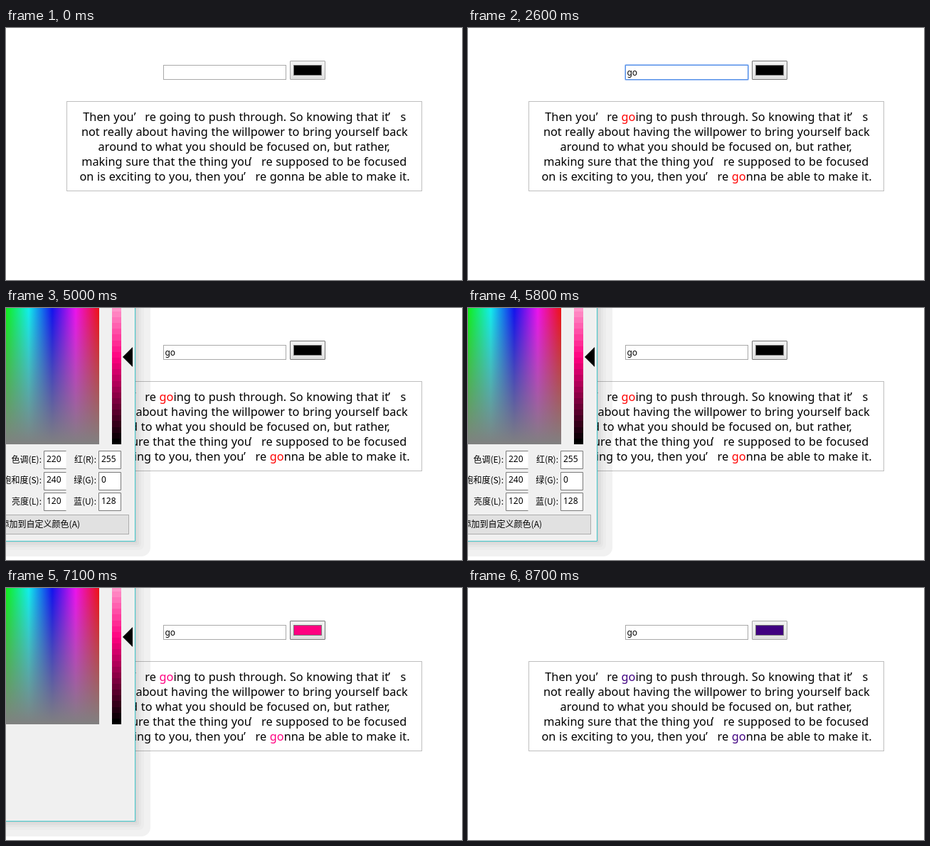
Write an HTML page that moves like this. It is 641x355 px and loops after 9700 ms.

```html
<!DOCTYPE html>
<html lang="en">
<head>
<meta charset="utf-8">
<title>Keyword highlighter</title>
<style>
  html, body { margin: 0; width: 100%; height: 100%; overflow: hidden; background: #fff; }
  svg { display: block; }
  text { white-space: pre; }
  .copy { font: 16.3px "Noto Sans", "Open Sans", sans-serif; word-spacing: .45px; }
  .entry { font: 12px "Noto Sans", "Open Sans", sans-serif; }
  .label { font: 12px "Noto Sans CJK SC", "Noto Sans CJK", "Noto Sans CJK JP", sans-serif; }
</style>
</head>
<body>
<svg id="stage" width="641" height="355" viewBox="0 0 641 355">
  <defs>
    <linearGradient id="hues" gradientUnits="userSpaceOnUse" x1="-1" x2="131" y1="0" y2="0">
      <stop offset="0" stop-color="#0f0"/>
      <stop offset=".25" stop-color="#0ff"/>
      <stop offset=".5" stop-color="#00f"/>
      <stop offset=".75" stop-color="#f0f"/>
      <stop offset="1" stop-color="#f00"/>
    </linearGradient>
    <linearGradient id="fade" x1="0" x2="0" y1="0" y2="1">
      <stop offset="0" stop-color="#808080" stop-opacity=".14"/>
      <stop offset="1" stop-color="#808080"/>
    </linearGradient>
    <linearGradient id="face" x1="0" x2="0" y1="0" y2="1">
      <stop offset=".3" stop-color="#f0f0f0"/>
      <stop offset="1" stop-color="#dedede"/>
    </linearGradient>
    <clipPath id="ghostArea"><rect x="140" y="200" width="41" height="28"/></clipPath>
  </defs>
  <rect width="641" height="355" fill="#fff"/>
  <rect x="85.5" y="103.5" width="499" height="126" fill="#fff" stroke="#bfbfbf"/>
  <g id="copy" class="copy"></g>

  <rect id="ring" x="220.5" y="51.5" width="174" height="22" rx="1" fill="none" stroke="#a6c5f5"/>
  <rect id="input" x="221.5" y="52.5" width="172" height="20" fill="#fff"/>
  <text id="query" class="entry" x="223.4" y="67"></text>
  <rect id="caret" y="55" width="1" height="15"/>

  <rect id="button" x="399.5" y="46.5" width="49" height="26" rx=".5" fill="url(#face)"/>
  <rect id="swatch" x="404.5" y="52.5" width="39" height="14" stroke="#777"/>

  <g id="dialog">
    <g id="shadow"></g>
    <rect width="182" height="329" fill="#f0f0f0"/>
    <path d="M181.5 0V328.5H0" fill="none" stroke="#3fc6c9"/>
    <rect width="131" height="192" fill="url(#hues)"/>
    <rect width="131" height="192" fill="url(#fade)"/>
    <path id="marker" d="M62 182h3v6h-3zM54 188h6v4h-6zM67 188h6v4h-6z"/>
    <g id="bar"></g>
    <path id="arrow" d="M164 0L178 -14V14Z"/>
    <g id="controls">
      <g id="fields"></g>
      <rect id="add" x="-20.5" y="291.5" width="193" height="27"/>
      <text class="label" x="104" y="309" text-anchor="end">添加到自定义颜色(A)</text>
    </g>
    <text id="ghost" class="copy" x="144.5" y="215" opacity=".07" clip-path="url(#ghostArea)">exciting</text>
  </g>
</svg>
<script>
const LOOP = 9700;
const $ = id => document.getElementById(id);

function add(parent, tag, attrs, text) {
  const el = document.createElementNS("http://www.w3.org/2000/svg", tag);
  set(el, attrs);
  if (text) el.textContent = text;
  parent.appendChild(el);
  return el;
}
function set(el, attrs) {
  for (const key in attrs) el.setAttribute(key, attrs[key]);
}
const show = (id, on) => set($(id), { visibility: on ? "visible" : "hidden" });
const within = (t, from, to) => t >= from && t < to;

// Last value whose start time has been reached
const at = (t, steps) => steps.reduce((value, [start, next]) => t >= start ? next : value, null);

// Each run: x, line, text
const RUNS = [
  [108.3, 0, "Then you"], [179.7, 0, "’"],
  [195.3, 0, "re going to push through. So knowing that it"], [537.3, 0, "’"], [554.5, 0, "s"],
  [105.9, 1, "not really about having the willpower to bring yourself back"],
  [129.6, 2, "around to what you should be focused on, but rather,"],
  [106.2, 3, "making sure that the thing you"], [342.5, 3, "’"],
  [359, 3, "re supposed to be focused"],
  [103.4, 4, "on is exciting to you, then you"], [334, 4, "’"],
  [350.6, 4, "re gonna be able to make it."]
];
const runs = RUNS.map(([x, line, text]) => ({ text, el: add($("copy"), "text", { x, y: 131 + 21 * line }) }));

let painted = null;
function paintCopy(query, color) {
  if (painted === query + color) return;
  painted = query + color;
  for (const { text, el } of runs) {
    el.textContent = "";
    const parts = query ? text.split(query) : [text];
    parts.forEach((part, i) => {
      if (i) add(el, "tspan", { fill: color }, query);
      if (part) add(el, "tspan", {}, part);
    });
  }
}

for (const [grow, opacity] of [[21, .055], [12, .02], [8, .025], [5, .03], [2, .04]]) {
  add($("shadow"), "rect", {
    x: -40, y: -40, width: 222 + grow, height: 369 + grow, rx: grow * .6, opacity
  });
}

const BAND = 244 / 30;
const lumY = lum => 192 - lum * 244 / 240;
const bands = [];
for (let i = 0; i < 24; i++) {
  const top = Math.max(0, Math.round(192 - (i + 1) * BAND));
  const bottom = Math.round(192 - i * BAND);
  bands.push(add($("bar"), "rect", { x: 149, y: top, width: 13, height: bottom - top }));
}

const LABELS = [["色调(E):", "红(R):"], ["饱和度(S):", "绿(G):"], ["亮度(L):", "蓝(U):"]];
const values = [[], []];
LABELS.forEach((pair, row) => {
  const y = [201.5, 231.5, 260.5][row];
  const base = [217, 246, 276][row];
  pair.forEach((label, col) => {
    const x = col ? 130.5 : 53.5;
    const g = $("fields");
    add(g, "text", { class: "label", x: col ? 127 : 50, y: base + 1, "text-anchor": "end" }, label);
    add(g, "rect", { x, y, width: 31, height: 25, fill: "#fff" });
    add(g, "path", { d: `M${x + 31} ${y}H${x}v25h31${col ? "z" : ""}`, fill: "none", stroke: "#7a7a7a" });
    values[col].push(add(g, "text", { class: "entry", x: x + 3.5, y: base }));
  });
});

const BLACK = { hsl: [160, 0, 0], rgb: [0, 0, 0] };
const PINK = { hsl: [220, 240, 120], rgb: [255, 0, 128] };
const INDIGO = { hsl: [180, 240, 60], rgb: [64, 0, 128] };
const css = color => `rgb(${color.rgb})`;

function paintPicker(color) {
  const [hue, sat, lum] = color.hsl;
  bands.forEach((band, i) => set(band, {
    fill: `hsl(${hue * 1.5}, ${sat / 2.4}%, ${i / 29 * 100}%)`
  }));
  set($("arrow"), { transform: `translate(0 ${Math.round(lumY(lum)) - 1})` });
  values[0].forEach((el, i) => el.textContent = color.hsl[i]);
  values[1].forEach((el, i) => el.textContent = color.rgb[i]);
}

const mix = (a, b, k) => `rgb(${a.map((v, i) => Math.round(v + (b[i] - v) * k))})`;

function render(t) {
  const query = at(t, [[0, ""], [1100, "g"], [1200, "go"]]);
  const chosen = at(t, [[0, BLACK], [6000, PINK], [8700, INDIGO]]);
  paintCopy(query, chosen === BLACK ? "#f00" : css(chosen));

  const focus = within(t, 600, 2900);
  show("ring", focus);
  set($("input"), { stroke: focus ? "#5590e8" : "#a9a9a9" });
  $("query").textContent = query;
  show("caret", within(t, 600, 1600) || within(t, 2100, 2600));
  set($("caret"), { x: [223, 230, 238][query.length] });

  const hover = within(t, 2500, 6000) || within(t, 6900, 8700);
  set($("button"), { stroke: hover ? "#777" : "#a6a6a6" });
  set($("swatch"), { fill: css(chosen) });

  const opacity = at(t, [[0, 0], [2900, .93], [3000, 1], [6000, 0], [7000, .6], [7100, 1], [8700, 0]]);
  set($("dialog"), { opacity });
  const picked = at(t, [[0, BLACK], [5000, PINK], [8000, INDIGO]]);
  paintPicker(picked);
  show("marker", within(t, 3000, 5000));
  show("ghost", within(t, 3000, 5000));
  show("controls", within(t, 3000, 6000) || t >= 7200);

  const glow = at(t, [[0, 0], [5300, .4], [5400, .8], [5500, 1], [5600, .7], [5700, .35], [5800, 0]]);
  set($("add"), {
    fill: mix([225, 225, 225], [229, 241, 251], glow),
    stroke: mix([173, 173, 173], [0, 120, 215], glow)
  });
}

const start = performance.now();
function tick() {
  render((performance.now() - start) % LOOP);
  requestAnimationFrame(tick);
}
tick();
</script>
</body>
</html>
```
